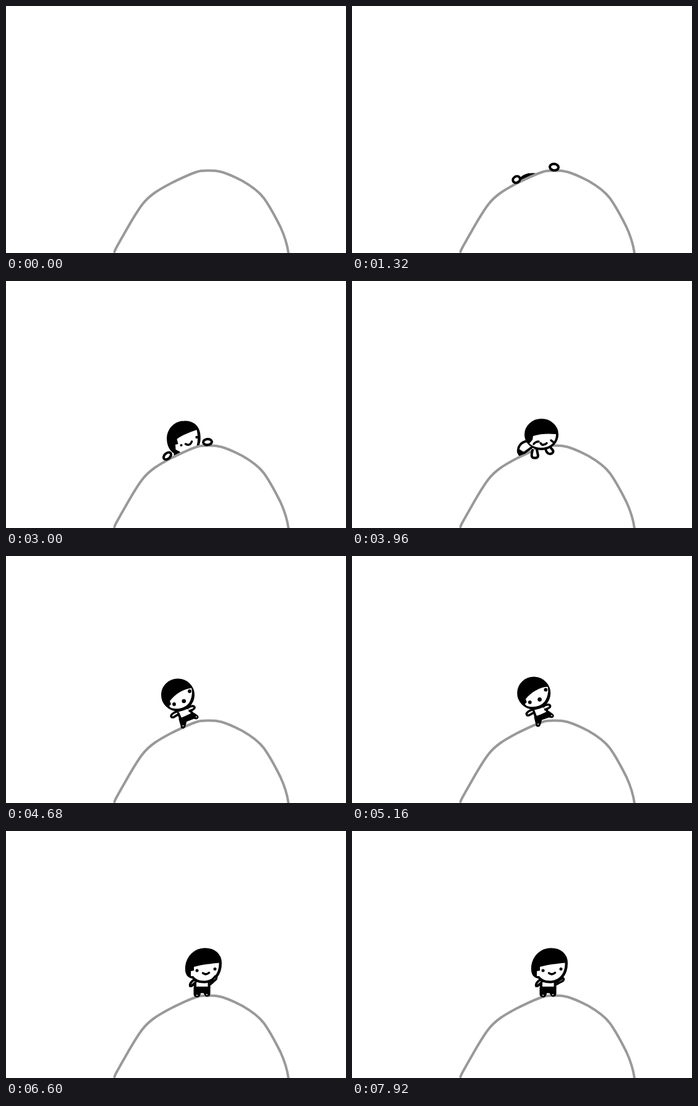
An HTML page that plays this animation: 550x400 px, repeating every 8000 ms.

```html
<!DOCTYPE html>
<html lang="en">
<head>
<meta charset="utf-8">
<title>Over the hill</title>
<style>
  html, body { margin: 0; width: 100%; height: 100%; overflow: hidden; background: #fff; }
  svg { display: block; width: 550px; height: 400px; }
  .ink { fill: #000; stroke: #000; }
  .skin { fill: #fff; stroke: #000; }
  .face { fill: #fff; stroke: none; }
  .line { fill: none; stroke: #000; }
  .dot { fill: #000; stroke: none; }
  .pose { visibility: hidden; }
</style>
</head>
<body>
<svg viewBox="0 0 550 400" stroke-width="4" stroke-linecap="round" stroke-linejoin="round">
  <g id="peek" class="pose">
    <path class="ink" d="M276 276C266 270 263.5 258 265 248C268 234 279 226.5 291 226.5C304 226 312 233 314.5 244C316 254 315 261 312 266L312 290H276Z"/>
    <path class="face" d="M279 254C288 247 300 243 311 239C313.5 250 313 260 310 268L308 290H285L284 274.5 277 271 276.5 263 281 262Z"/>
    <circle class="dot" cx="286" cy="264" r="2"/>
    <circle class="dot" cx="311" cy="251" r="2.2"/>
    <path class="line" stroke-width="3.5" d="M293 262Q300 266 303 258"/>
  </g>

  <path fill="#fff" stroke="#999" d="M175.5 398C177 393 180 389 187 376C198 357 208 338 220 322C232 306 248 297 267 287C281 280 295 273 309 268.5C316 266 336 266 345 268C357 270 370 277 382 283C396 291 408 299 417 311C428 326 436 342 444 358C450 371 455 386 457 401"/>

  <ellipse id="handL" class="skin pose"/>
  <ellipse id="handR" class="skin pose"/>

  <g id="climb" class="pose">
    <path class="skin" d="M284 259C273 261 268 268 269 277L271 281 279 278 290 270"/>
    <path class="ink" stroke-width="2" d="M270 273L278 278 271 282Z"/>
    <path class="skin" d="M292 274C290 282 290 286 294 286.5C299 287 301 285 301 283L299 273"/>
    <path class="skin" d="M313 271C314 277 317 280 320 280C325 280 327 276 324 273L320 268"/>
    <ellipse class="ink" cx="306.5" cy="248.5" rx="25.5" ry="23.5"/>
    <path class="face" d="M293 251C305 247 318 247 330 248C330 263 319 270 306 270C298 270 291 267 287 263L292 257Z"/>
    <path class="line" stroke-width="3.5" d="M294 264Q297 260 302 260M322 258L327 262M305 262.500Q308 267 311 264.500Q313 265 315 262.500"/>
  </g>

  <g id="tilt" class="pose">
    <path class="skin" d="M277 251L283 265 302 256 295 245Z"/>
    <path class="skin" stroke-width="3.5" d="M276 252C270 254 265 258 268 261C271 263 275 258 278 257"/>
    <path class="skin" stroke-width="3.5" d="M294 246C300 241 306 243 305 246C304 249 299 250 297 251"/>
    <path class="ink" stroke-width="3" d="M281 264C290 262 296 257 303 255L309 259C312 262 308 264 304 262L291 267 289 275C288 279 284 279 284 275Z"/>
    <circle class="face" cx="308" cy="260.500" r="1"/>
    <circle class="face" cx="286.500" cy="275" r="1"/>
    <ellipse class="ink" cx="278" cy="225" rx="25" ry="24.500"/>
    <path class="face" d="M265 235C273 224 287 215 300 214C302 220 301 230 296 238C289 247 277 249 267 246L264 243 267 240Z"/>
    <circle class="dot" cx="272" cy="240" r="2.900"/>
    <circle class="dot" cx="297" cy="219" r="2.900"/>
    <circle class="dot" cx="287.700" cy="235" r="3.300"/>
  </g>

  <g id="stand" class="pose">
    <path class="skin" d="M305 243L306 258H327L328 243Z"/>
    <path class="ink" stroke-width="3" d="M304 258H328L326 265H321L320 262H312L309 268H304Z"/>
    <path class="skin" d="M305 245C303 252 303 257 305 259C309 260 312 256 311 249"/>
    <path class="skin" d="M327 246C327 251 328 256 331 256C335 254 332 249 330 245"/>
    <path class="ink" d="M319 193.500C336 192 349 203 349 217C349 232 336 245 320 245C309 245 304 241 302 237C294 237 290 230 290 222C291 206 303 196 319 193.500Z"/>
    <path class="face" d="M305 219C319 216 334 216 346.500 215C347 230 336 241 321 243C311 243 306 240 303 235L299.500 234 300 227 303 225Z"/>
    <circle class="dot" cx="310" cy="225" r="2.700"/>
    <circle class="dot" cx="336" cy="223" r="2.700"/>
    <path class="line" d="M321 231Q325 234 328.500 231"/>
  </g>

  <g id="wave" class="pose">
    <path class="skin" d="M306 243V254H328.500V243Z"/>
    <path class="skin" d="M304 241C300 244 297 248 298 251C301 252 304 247 306 246"/>
    <path class="ink" stroke-width="3" d="M305 253.500H329V263C329 268 323 268 322 264L320 261H314L313 265C311 270 305 268 305 264Z"/>
    <circle class="face" cx="309" cy="266" r="1"/>
    <circle class="face" cx="325" cy="265" r="1"/>
    <path class="ink" d="M321 191.500C336 191 347 200 347 214C347 231 338 244 322 244.500C312 245 306 243 302 237C294 236 291 229 292 219C294 203 306 192 321 191.500Z"/>
    <path class="face" d="M304 220C318 216 332 215 344.500 213.500C345 229 337 241 322 242.500C312 243 306 239 303 235L299 235 299 227 304 226Z"/>
    <circle class="dot" cx="309" cy="226" r="2.500"/>
    <circle class="dot" cx="338" cy="223.500" r="2.500"/>
    <path class="line" stroke-width="3.500" d="M318.500 230Q323 234 328.500 229.500"/>
    <path id="arm" class="skin" stroke-width="3.500" d="M329 245C335 243 339 239 341 238C344 240 342 243 339 244C335 246 332 248 329 249"/>
  </g>
</svg>
<script>
const LOOP = 8000, START = 1200, STEP = 120;
const $ = id => document.getElementById(id);
const poses = [...document.querySelectorAll("g.pose")];
const pivots = { peek: "290 260", climb: "300 280", tilt: "287 277", stand: "316 268", wave: "317 268" };

// step, pose, dx, dy, rotation
const keys = [
  [0, "peek", 0, 60, 0], [1, "peek", 0, 46, 0], [5, "peek", 0, -2, 0], [7, "peek", 0, 0, 0],
  [9, "peek", 1, 1, 0], [11, "peek", -1, -1, 0], [13, "peek", -2.5, 1, 0],
  [15, "peek", -2.5, 2, 0], [17, "peek", -1, 6, 0],
  [18, "climb", -3, 3, -6], [20, "climb", 0, 2, 0], [23, "climb", 0, 0, 0],
  [25, "climb", 4, -2, 0], [26, "climb", 5, -6, 0],
  [27, "tilt", 12, 3, 3], [29, "tilt", 0, 0, 0], [31, "tilt", 0, 0, -3], [34, "tilt", 22, -4, 4],
  [35, "stand", -6, 1, -5], [36, "stand", 1, 0, 2], [37, "stand", 0, 0, 0], [39, "stand", 0, 0, 0],
  [40, "wave", 0, 1, 0], [41, "wave", 0, 0, 0]
];

// cx, cy, rx, ry, rotation: gripping, then leaning
const hands = {
  handL: [[266, 281, 6, 5, -30], [261, 283.3, 7, 4.5, -42]],
  handR: [[327, 261, 7, 5.2, 8], [326, 260.7, 7, 4.7, -5]]
};

const mix = (a, b, f) => a + (b - a) * f;
const show = (el, on) => { el.style.visibility = on ? "visible" : "hidden"; };

function poseAt(k) {
  let i = 0;
  while (i + 1 < keys.length && keys[i + 1][0] <= k) i++;
  const a = keys[i], b = keys[i + 1];
  if (!b || a[1] !== b[1]) return a.slice(1);
  const f = (k - a[0]) / (b[0] - a[0]);
  return [a[1], ...[2, 3, 4].map(n => mix(a[n], b[n], f))];
}

function drawHand(id, lean, on) {
  const [cx, cy, rx, ry, turn] = hands[id][0].map((v, i) => mix(v, hands[id][1][i], lean));
  const el = $(id);
  show(el, on);
  for (const [name, value] of Object.entries({ cx, cy, rx, ry })) el.setAttribute(name, value);
  el.setAttribute("transform", `rotate(${turn} ${cx} ${cy})`);
}

function draw(t) {
  const k = Math.floor((t - START) / STEP);
  const [name, dx, dy, turn] = k < 0 ? [""] : poseAt(k);
  poses.forEach(g => show(g, g.id === name));
  if (name) $(name).setAttribute("transform", `translate(${dx} ${dy}) rotate(${turn} ${pivots[name]})`);

  const lean = Math.min(1, Math.max(0, (k - 8) / 5));
  drawHand("handL", lean, name === "peek");
  drawHand("handR", lean, name === "peek" && k > 0);
  $("arm").setAttribute("transform", `rotate(${k % 2 ? -14 : 0} 329 247)`);
}

const begin = performance.now();
function tick() {
  draw((performance.now() - begin) % LOOP);
  requestAnimationFrame(tick);
}
tick();
</script>
</body>
</html>
```
